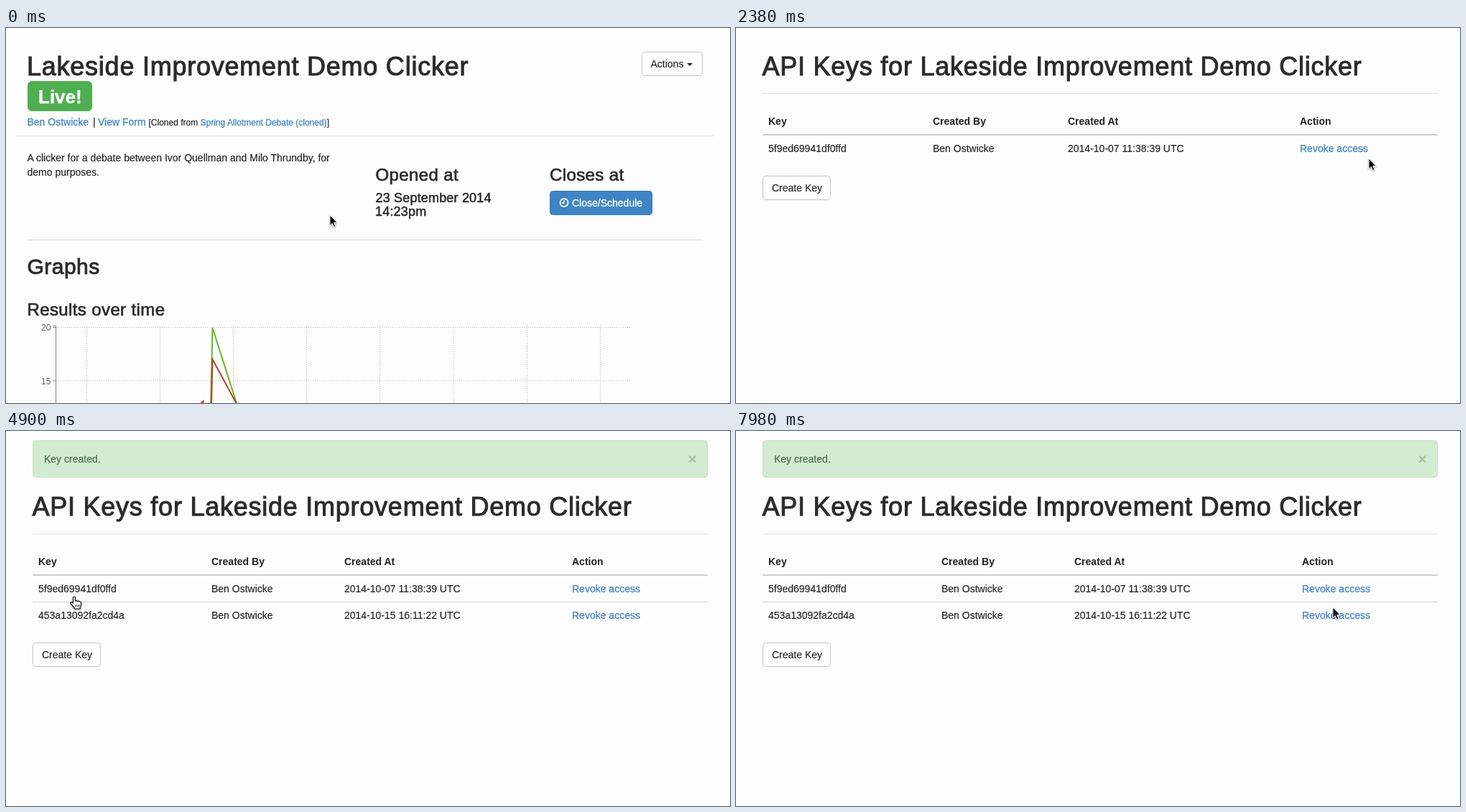
These frames come from a looping animation (1008x523 px, 8000 ms). An HTML page:

```html
<!DOCTYPE html>
<html lang="en">
<head>
<meta charset="utf-8">
<title>Clicker keys</title>
<style>
html, body { margin: 0; height: 100%; overflow: hidden; background: #fdfdfd; }
svg { display: block; width: 100%; height: 100%; }
text { font: 14px "Liberation Sans", Arial, sans-serif; fill: #222; stroke: #222; stroke-width: .15; white-space: pre; }
.h1, .h2, .h3, .h4 { fill: #2b2b2b; stroke: #2b2b2b; }
.h1 { font-size: 36px; letter-spacing: .021em; stroke-width: 1; }
.h2 { font-size: 30px; letter-spacing: .016em; stroke-width: .9; }
.h3 { font-size: 24px; letter-spacing: .016em; stroke-width: .7; }
.h4 { font-size: 18px; letter-spacing: .01em; stroke-width: .55; }
.b { font-weight: bold; stroke: none; }
.s { font-size: 12px; }
.axis { font-size: 12px; fill: #666; stroke: none; }
.a { fill: #3f82c3; stroke: #3f82c3; stroke-width: .25; }
.a.on { fill: #2a6496; stroke: #2a6496; text-decoration: underline; }
.w { fill: #fff; stroke: #fff; stroke-width: .3; }
.live { font-size: 26px; fill: #fff; stroke: #fff; stroke-width: .4; }
.ok { fill: #47694a; stroke: #47694a; }
.x { font-size: 21px; fill: #a6bda5; }
.btn { fill: #fff; stroke: #c4c4c4; }
.btn.on { fill: #e2e2e2; stroke: #adadad; }
.btn.down { fill: #d2d2d2; stroke: #a0a0a0; }
.grid { stroke: #b4b4b4; stroke-dasharray: 1 2; }
.line { fill: none; stroke-width: 2; }
#panel { filter: drop-shadow(0 5px 5px rgba(0,0,0,.2)); }
#cursor { filter: drop-shadow(0 1px 1px rgba(0,0,0,.4)); }
</style>
</head>
<body>
<svg id="stage" viewBox="0 0 1008 523"></svg>
<script>
const TITLE = 'Lakeside Improvement Demo Clicker', OWNER = 'Ben Ostwicke';
const stage = document.getElementById('stage');
const $ = id => document.getElementById(id);

const text = (x, y, s, cls = '', id = '') => `<text x="${x}" y="${y}" class="${cls}" id="${id}">${s}</text>`;
const rect = (x, y, w, h, attr) => `<rect x="${x}" y="${y}" width="${w}" height="${h}" ${attr}/>`;
const line = (x1, y1, x2, y2, attr) => `<path d="M${x1} ${y1}L${x2} ${y2}" ${attr}/>`;
const rule = (x1, x2, y, color, w = 1) => line(x1, y, x2, y, `stroke="${color}" stroke-width="${w}"`);
const button = (x, y, w, id) => rect(x + .5, y + .5, w - 1, 33, `rx="4" class="btn" id="${id}"`);

function chart() {
  let s = '';
  for (let i = 0; i < 8; i++) {
    const x = Math.floor(112 + i * 102.2) + .5;
    s += line(x, 415, x, 523, 'class="grid"');
  }
  [20, 15].forEach((v, i) => {
    const y = 417.5 + i * 74.5;
    s += line(70, y, 869, y, 'class="grid"') + rule(65, 70, y, '#888') + text(49, y + 4.5, v, 'axis');
  });
  return s + '<path d="M65 415.5H69.5V523" fill="none" stroke="#888"/>' +
    '<path d="M285 525L287.5 418L321.5 525" class="line" stroke="#6cb52d"/>' +
    '<path d="M270 525L274.5 520.5L275 525M286 525L287.5 462L321 524" class="line" stroke="#b5432f"/>';
}

function menu() {
  const items = [['Clone', 88], ['Edit', 133], ['Get Code', 159], ['API Keys', 185], ['Permissions', 211], ['Delete', 256]];
  const icons = [
    'M829 87l3.500-4 3.500 4h-2v4h5l2 2h-9v-6zM835 83h9v6h2l-3.500 4-3.500-4h2v-4h-4z',
    'M831 139l1-4 7-7 3 3-7 7zM840 127l1-1q1-.8 2 .2l1 1q.8 1 0 1.800l-1 1z',
    'M830 153h4v3h-4zm5 0h10v3h-10zM830 157.500h4v3h-4zm5 0h10v3h-10zM830 162h4v3h-4zm5 0h10v3h-10z',
    'M831 178h6l7 7-5.500 6-7.500-7zm2.500 1.500a1.200 1.200 0 1 0 .1 0z',
    'M837.500 204c5 0 3.500 6 1.500 8 0 2 5.500 1.500 5.500 5h-14c0-3.500 5.500-3 5.500-5-2-2-3.500-8 1.500-8z',
    'M832 252l2-2 3.500 3.500 3.500-3.500 2 2-3.500 3.500 3.500 3.500-2 2-3.500-3.500-3.500 3.500-2-2 3.500-3.500z'
  ];
  return '<g id="menu">' + rect(810.5, 69.500, 159, 205, 'rx="4" fill="#fff" stroke="#bdbdbd" id="panel"') +
    rect(811, 0, 158, 26, 'fill="#f0f0f0" id="row"') +
    rule(811, 969, 110.5, '#dedede') + rule(811, 969, 233.5, '#dedede') +
    `<path d="${icons.join('')}" fill="#2b2b2b" fill-rule="evenodd"/>` +
    items.map(([s, y]) => text(848, y + 5, s)).join('') + '</g>';
}

function overview() {
  return '<g id="page0">' + text(29, 66, TITLE, 'h1') +
    rect(30, 74, 90, 42, 'rx="6" fill="#4fae50"') + text(45, 105, 'Live!', 'b live') +
    text(29.5, 136, OWNER, 'a') + text(121, 136, '|') + text(128, 136, 'View Form', 'a') +
    text(198.5, 136, '[Cloned from <tspan class="a">Spring Allotment Debate (cloned)</tspan>]', 's') +
    rule(15, 985, 150.5, '#d8ead3') +
    text(29.5, 186, 'A clicker for a debate between Ivor Quellman and Milo Thrundby, for') +
    text(29.5, 206, 'demo purposes.') +
    text(514.5, 213, 'Opened at', 'h3') + text(514.5, 243, '23 September 2014', 'h4') + text(514, 262, '14:23pm', 'h4') +
    text(757, 213, 'Closes at', 'h3') +
    rect(757.5, 227.5, 142, 33, 'rx="4" fill="#3f84c5" stroke="#367ab8"') +
    '<circle cx="777" cy="243.500" r="5.500" fill="none" stroke="#fff" stroke-width="1.800"/>' +
    '<path d="M777 240v4h-3" fill="none" stroke="#fff" stroke-width="1.300"/>' +
    text(788, 249, 'Close/Schedule', 'w') +
    rule(30, 970, 295.5, '#e1e1e1') +
    text(29.5, 343, 'Graphs', 'h2') + text(29.5, 401, 'Results over time', 'h3') + chart() +
    button(885, 33, 85, 'actions') + text(897.5, 55, 'Actions') +
    '<path d="M948 49h8l-4 4z" fill="#222"/>' + menu() + '</g>';
}

function keyPage(id, dy, cols, keys) {
  const cells = (y, row, cls) => row.map((s, i) => text(cols[i], y, s, cls)).join('');
  let s = `<g id="${id}">` + text(36.5, 66 + dy, 'API Keys for ' + TITLE, 'h1') +
    rule(37, 977, 91.5 + dy, '#e3e3e3') +
    cells(135 + dy, ['Key', 'Created By', 'Created At', 'Action'], 'b') +
    rule(37, 977, 149 + dy, '#cfcfcf', 2);
  keys.forEach(([key, date], i) => {
    const y = 173 + dy + i * 37;
    if (i) s += rule(37, 977, y - 23.5, '#d0d0d0');
    s += cells(y, [key, OWNER, date + ' UTC']) + text(cols[3], y, 'Revoke access', 'a', id + 'link' + i);
  });
  const by = 169 + dy + keys.length * 37;
  return s + button(37, by, 95, id + 'create') + text(50, by + 22, 'Create Key') + '</g>';
}

const keys = [['5f9ed69941df0ffd', '2014-10-07 11:38:39'], ['453a13092fa2cd4a', '2014-10-15 16:11:22']];
stage.innerHTML = overview() +
  keyPage('page1', 0, [45, 274, 462, 785], keys.slice(0, 1)) +
  keyPage('page2', 52, [45, 286, 471, 788], keys) +
  '<g id="alert">' + rect(37.5, 13.5, 939, 51, 'rx="4" fill="#d3ebd0" stroke="#c5dfba"') +
  text(53, 44, 'Key created.', 'ok') + text(949.5, 46, '×', 'b x') + '</g>' +
  `<g id="cursor">
    <path id="arrow" d="M0 0V14.500L3.300 11.500L5.500 16.700L7.900 15.700L5.700 10.600H10.300Z" fill="#000" stroke="#fff" stroke-width="1"/>
    <g id="hand" fill="#fff" stroke="#111" stroke-width="1.200" stroke-linejoin="round">
      <path d="M-1.500 9V1.500a1.500 1.500 0 0 1 3 0V6q1.500-1 3 .5q1.600-.8 3 .6q1.800-.4 2 1.400V11q0 2-1.200 3.500V17H.5q-.5-2-2.500-4L-5 9.500q-.8-1.500.8-1.800Q-3 7.500-1.500 9Z"/>
      <path d="M2 11v3.500M4.300 11v3.500M6.500 11v3.500" stroke-width=".9"/>
    </g></g>`;

// Pointer waypoints: step, x, y
const STEP = 140;
const path = [
  [0, 451, 261], [1, 460, 256], [3, 720, 140], [5, 918, 62], [6, 930, 55], [7, 930, 55],
  [8, 929, 62], [9, 919, 98], [11, 881, 182], [18, 881, 182], [19, 868, 188], [22, 370, 256],
  [23, 233, 243], [24, 150, 236], [26, 95, 231], [35, 95, 231], [36, 99, 238], [38, 140, 290],
  [41, 228, 357], [42, 228, 357], [45, 737, 303], [47, 845, 187], [49, 836, 216], [52, 836, 216],
  [55, 833, 259], [57, 831, 246], [58, 831, 246]
];

function pointer(k) {
  const i = path.findIndex(p => p[0] > k);
  const [k0, x0, y0] = path[i - 1], [k1, x1, y1] = path[i];
  const f = (k - k0) / (k1 - k0);
  return [x0 + (x1 - x0) * f, y0 + (y1 - y0) * f];
}

const show = (id, on) => $(id).style.display = on ? '' : 'none';
const mark = (id, on, cls = 'on') => $(id).classList.toggle(cls, on);

function draw() {
  const k = Math.floor(performance.now() % 8000 / STEP);
  const [x, y] = pointer(k);
  const over = (l, t, r, b) => x >= l && x <= r && y >= t && y <= b;
  const page = k < 17 ? 0 : k < 35 ? 1 : 2;
  const open = k >= 6 && k < 14;

  for (let i = 0; i < 3; i++) show('page' + i, page === i);
  show('alert', page === 2);
  show('menu', open);

  const onActions = page === 0 && over(885, 33, 970, 67);
  mark('actions', onActions || open);
  const row = [88, 133, 159, 185, 211, 256].find(c => Math.abs(y - c) < 13);
  show('row', open && row);
  if (row) $('row').setAttribute('y', row - 13);

  const onCreate = page === 1 && over(37, 206, 132, 240);
  mark('page1create', onCreate);
  mark('page1create', k === 29, 'down');

  const links = [0, 1].map(i => page === 2 && over(788, 211 + i * 37, 883, 230 + i * 37));
  links.forEach((on, i) => mark('page2link' + i, on));

  const hand = onActions || (open && row) || onCreate || k === 35 || links.includes(true);
  show('hand', hand);
  show('arrow', !hand);
  $('cursor').setAttribute('transform', `translate(${x} ${y})`);
  requestAnimationFrame(draw);
}
draw();
</script>
</body>
</html>
```
